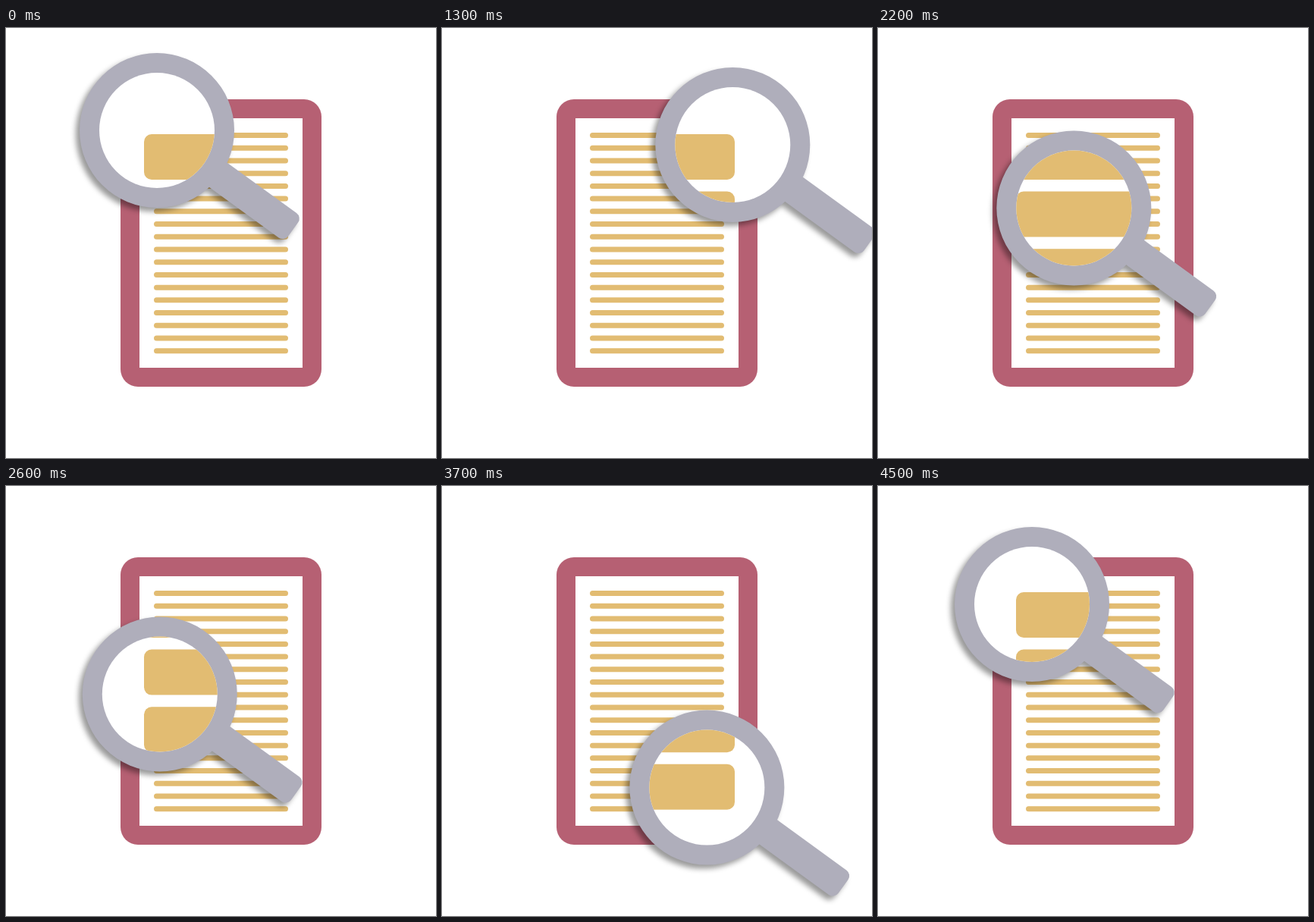
These frames come from a looping animation (567 px wide and 567 px high, 4600 ms). An HTML page with a canvas:

```html
<!DOCTYPE html>
<html lang="en">
<head>
<meta charset="utf-8">
<title>Magnifier over a document</title>
<style>
  html, body { margin: 0; width: 100%; height: 100%; overflow: hidden; background: #fff; }
  canvas { display: block; width: 567px; height: 567px; }
</style>
</head>
<body>
<canvas id="stage" width="567" height="567"></canvas>
<script>
const ctx = document.getElementById('stage').getContext('2d');
const RED = '#b66073', GOLD = '#e2bc72', GREY = '#afaebb', WHITE = '#fff';
const STEP = 100, STEPS = 46;

// Lens centre waypoints: [step, x, y], joined by straight, even motion
const PATH = [
  [0, 199, 135], [13, 383.3, 154], [26, 202.8, 274.5], [39, 376, 420], [45, 203, 156]
];

function lensAt(step) {
  const i = Math.max(1, PATH.findIndex(p => p[0] >= step));
  const [s0, x0, y0] = PATH[i - 1], [s1, x1, y1] = PATH[i];
  const k = (step - s0) / (s1 - s0);
  return [x0 + (x1 - x0) * k, y0 + (y1 - y0) * k];
}

function box(color, x, y, w, h, r) {
  ctx.fillStyle = color;
  ctx.beginPath();
  ctx.roundRect(x, y, w, h, r);
  ctx.fill();
}

function drawPage() {
  box(RED, 151, 94, 265, 379, 23);
  box(WHITE, 176, 119, 215, 329, 0);
  for (let i = 0; i < 18; i++) box(GOLD, 195, 138 + i * 16.72, 177, 7, 3.5);
}

function drawBody(x, y) {
  const shape = new Path2D();
  const handle = new Path2D();
  shape.arc(0, 0, 102, 0, 2 * Math.PI);
  handle.roundRect(60, -20, 162, 40, 9);
  shape.addPath(handle, new DOMMatrix().rotate(36));
  ctx.save();
  ctx.translate(x, y);
  ctx.shadowColor = 'rgba(0,0,0,.4)';
  ctx.shadowOffsetX = -5;
  ctx.shadowOffsetY = 5;
  ctx.shadowBlur = 7;
  ctx.fillStyle = GREY;
  ctx.fill(shape);
  ctx.restore();
}

// The enlarged lines stay put; the glass only reveals them
function drawGlass(x, y) {
  ctx.save();
  ctx.beginPath();
  ctx.arc(x, y, 76, 0, 2 * Math.PI);
  ctx.clip();
  box(WHITE, 0, 0, 567, 567, 0);
  for (let i = 0; i < 4; i++) box(GOLD, 182, 140 + i * 75.6, 204, 60, 10);
  ctx.restore();
}

const start = performance.now();

function draw() {
  const step = Math.floor((performance.now() - start) / STEP) % STEPS;
  const [x, y] = lensAt(step);
  box(WHITE, 0, 0, 567, 567, 0);
  drawPage();
  drawBody(x, y);
  drawGlass(x, y);
  requestAnimationFrame(draw);
}
draw();
</script>
</body>
</html>
```
